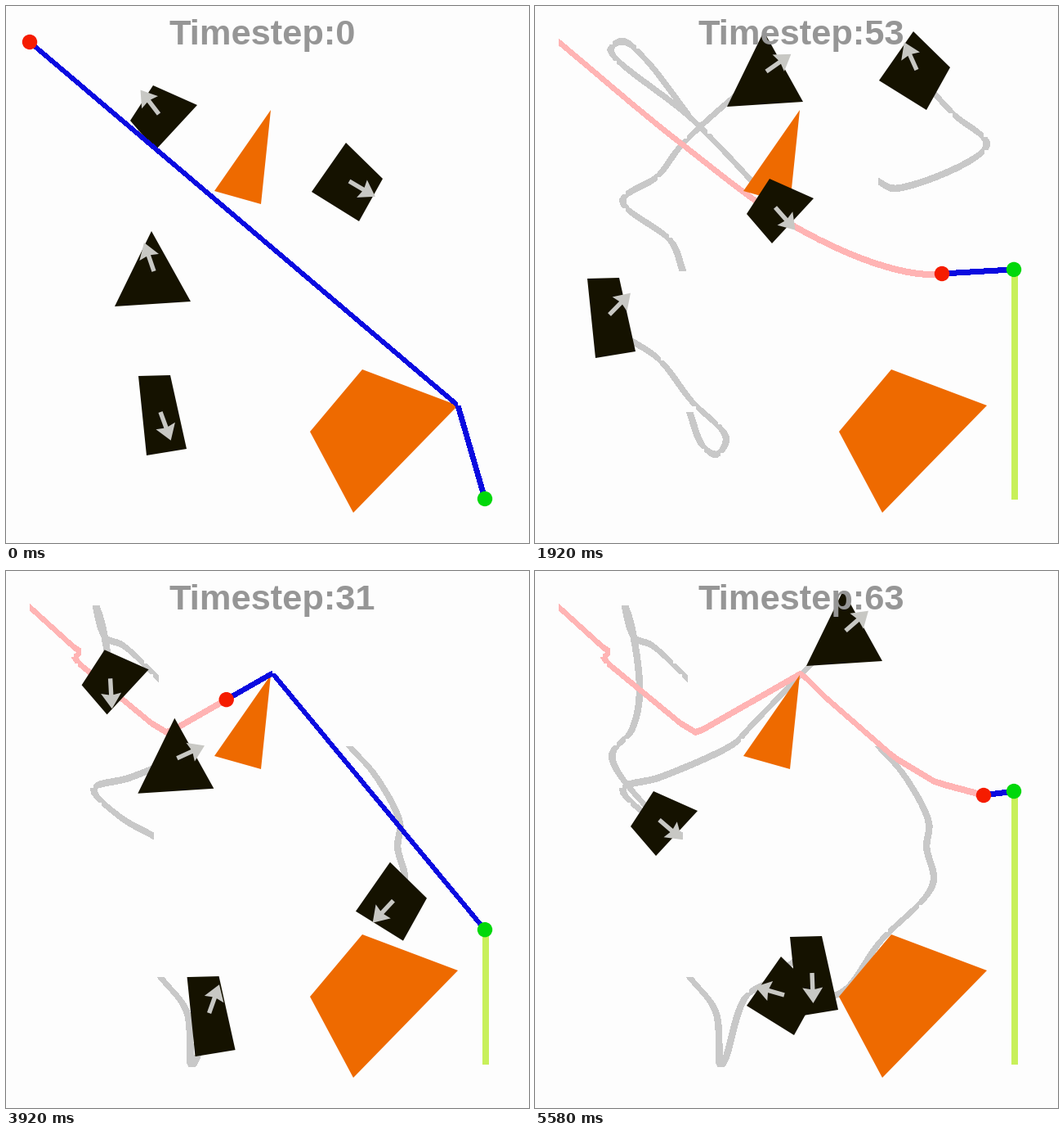
Write a matplotlib script that moves like this. It is 640 px wide and 656 px high and loops after 5.66 s.

```python
import numpy as np
import matplotlib.pyplot as plt
from matplotlib.animation import FuncAnimation
from matplotlib.collections import PolyCollection

W, H, DPI = 640, 656, 100
LOOP, TICK, STEP = 5660, 20, 1000 / 12
GOAL_X, GOAL_Y, GOAL_SPEED = 586, 602, 5.285


class Route:
    """Smooth curve through (x, y) points, walked evenly between timed (x, y, t) ones."""

    def __init__(self, *pts, bend=1):
        p = np.array([q[:2] for q in pts], float)
        u = np.r_[0, np.cumsum(np.sqrt(np.hypot(*np.diff(p, axis=0).T)))]
        m = bend * np.gradient(p, u, axis=0)
        s = np.linspace(0, 1, 25)[:, None]
        legs = []
        for i, du in enumerate(np.diff(u)):
            ease = s * s * (3 - 2 * s)
            legs.append(p[i] + (p[i + 1] - p[i]) * ease
                        + du * s * (1 - s) * ((1 - s) * m[i] - s * m[i + 1]))
        self.xy = np.vstack(legs)
        dist = np.r_[0, np.cumsum(np.hypot(*np.diff(self.xy, axis=0).T))]
        timed = [i for i, q in enumerate(pts) if len(q) == 3]
        ends = [dist[min(25 * i, len(dist) - 1)] for i in timed]
        self.t = np.interp(dist, ends, [pts[i][2] for i in timed])

    def at(self, t):
        return np.stack([np.interp(t, self.t, c) for c in self.xy.T], -1)

    def trace(self, t):
        return self.at(np.arange(t + 1))

    def heading(self, t):
        d = self.at(t + 1) - self.at(t)
        if not d.any():
            d = self.at(t) - self.at(t - 1)
        return d / np.hypot(*d)


# Outlines relative to each body's reference point
SHAPES = [np.array(s) for s in (
    [(-7, -35), (47, -11), (-4, 44), (-35, 8)],
    [(-3, -49), (45, 37), (-48, 43)],
    [(-4, -47), (41, -3), (12, 49), (-46, 13)],
    [(-27, -44), (12, -45), (32, 45), (-17, 53)],
)]
BLOCKS = [
    [(324, 127), (255, 226), (312, 242)],
    [(436, 444), (553, 488), (425, 619), (372, 520)],
]

# "via" holds planned waypoints: x, y and the time span in which they count
FIRST = dict(
    bodies=[
        Route((187, 132, 0), (135, 65), (108, 43), (92, 53), (193, 139, 35),
              (294, 246, 53), (338, 298, 61)),
        Route((181, 324, 0), (167, 288), (107, 238), (150, 208), (181, 168, 35),
              (283, 80, 53), (320, 58, 61)),
        Route((420, 214, 0), (440, 223), (553, 170), (511, 131, 35),
              (467, 78, 53), (461, 56), (478, 75, 61)),
        Route((189, 496, 0), (205, 537), (222, 548), (234, 528), (191, 482, 35),
              (150, 430), (84, 386), (91, 377, 53), (132, 339, 61)),
    ],
    agent=Route((29, 44, 0), (175, 165), (319, 270, 35), (435, 320),
                (498, 327, 53), (570, 300, 61)),
    via=[(553, 488, 0, 22)],
)
SECOND = dict(
    bodies=[
        Route((187, 132, 0), (142, 90, 7), (122, 82), (110, 42), (118, 67, 21),
              (128, 150), (118, 195, 41), (94, 226), (152, 304, 63), (170, 318, 65)),
        Route((181, 324, 0), (139, 300, 7), (107, 266), (153, 252, 21), (245, 210),
              (259, 195, 41), (330, 122), (380, 73, 63), (393, 62, 65)),
        Route((420, 214, 0), (452, 250, 7), (482, 308), (479, 337, 21), (487, 382),
              (423, 452, 41), (371, 517), (305, 518, 63), (288, 512, 65)),
        Route((189, 496, 0), (221, 538, 7), (227, 606), (233, 596, 21), (258, 520),
              (288, 501, 41), (342, 460), (339, 491, 63), (340, 507, 65)),
    ],
    agent=Route((29, 44, 0), (83, 93, 7), (92, 99), (82, 107), (178, 186, 21),
                (198, 198), (326, 125), (355, 154, 41), (440, 228), (490, 258),
                (549, 274, 63), bend=0),
    via=[(152, 184, 2, 14), (553, 488, 0, 16), (240, 230, 16, 24),
         (450, 412, 16, 24), (326, 125, 24, 38)],
)


def clock(step):
    """Run and timestep shown at a picture step."""
    if step < 28:
        return FIRST, round(np.interp(step, [0, 13, 23, 27], [0, 35, 53, 61]))
    return SECOND, round(np.interp(step, [28, 30, 41, 53, 67], [0, 7, 21, 41, 63]))


def stroke(pts, width):
    """Slanted bars whose width is measured along the minor axis."""
    a, b = pts[:-1], pts[1:]
    d = np.abs(b - a)
    steep = (d[:, 1] > d[:, 0])[:, None]
    off = np.where(steep, (width / 2, 0), (0, width / 2))
    return list(np.stack([a - off, b - off, b + off, a + off], 1))


def arrow(tail, u):
    n = np.array([-u[1], u[0]])
    half = [(0, 2.7), (20, 2.7), (18, 12.5), (37, 0)]
    outline = half + [(s, -r) for s, r in half[-2::-1]]
    return np.array([tail + s * u + r * n for s, r in outline])


fig = plt.figure(figsize=(W / DPI, H / DPI), dpi=DPI, facecolor="#fdfdfd")
ax = fig.add_axes([0, 0, 1, 1])
ax.set_xlim(0, W)
ax.set_ylim(H, 0)
ax.axis("off")


def layer(color, z, smooth=False):
    return ax.add_collection(PolyCollection(
        [], facecolors=color, edgecolors="none", linewidths=0,
        antialiaseds=smooth, zorder=z), autolim=False)


def dot(color):
    return ax.add_patch(plt.Circle((0, 0), 9.2, color=color, lw=0, zorder=8))


trails, pink, lime = layer("#c8c8c8", 1), layer("#ffb4b4", 2), layer("#c8f05a", 2)
blocks, bodies = layer("#ee6a00", 3, True), layer("#151200", 4, True)
arrows, plan = layer("#c8c8c4", 5, True), layer("#0a0ae0", 6)
blocks.set_verts(BLOCKS)
goal, agent = dot("#00d80a"), dot("#f51c00")
title = ax.text(199.5, 46.5, "", color="#969696", family="Liberation Sans",
                weight="bold", size=43.4 * 72 / DPI, va="baseline", zorder=9)


def draw(i):
    run, t = clock(int((i * TICK + 5) / STEP))
    title.set_text(f"Timestep:{t}")

    routes = run["bodies"]
    trails.set_verts([q for r in routes for q in stroke(r.trace(t), 7.5)])
    bodies.set_verts([r.at(t) + s for r, s in zip(routes, SHAPES)])
    arrows.set_verts([arrow(r.at(t), r.heading(t)) for r in routes])

    start = run["agent"].at(t)
    end = np.array([GOAL_X, GOAL_Y - GOAL_SPEED * t])
    pink.set_verts(stroke(run["agent"].trace(t), 7))
    lime.set_verts(stroke(np.array([(GOAL_X + 1, GOAL_Y + 1), end + (1, 0)]), 8))

    via = [(x, y) for x, y, t0, t1 in run["via"] if t0 <= t < t1]
    plan.set_verts(stroke(np.array([start, *via, end]), 6))
    agent.center, goal.center = start, end
    return trails, pink, lime, bodies, arrows, plan, agent, goal, title


anim = FuncAnimation(fig, draw, frames=LOOP // TICK, interval=TICK,
                     repeat=True, repeat_delay=0, blit=False)
plt.show()
```
